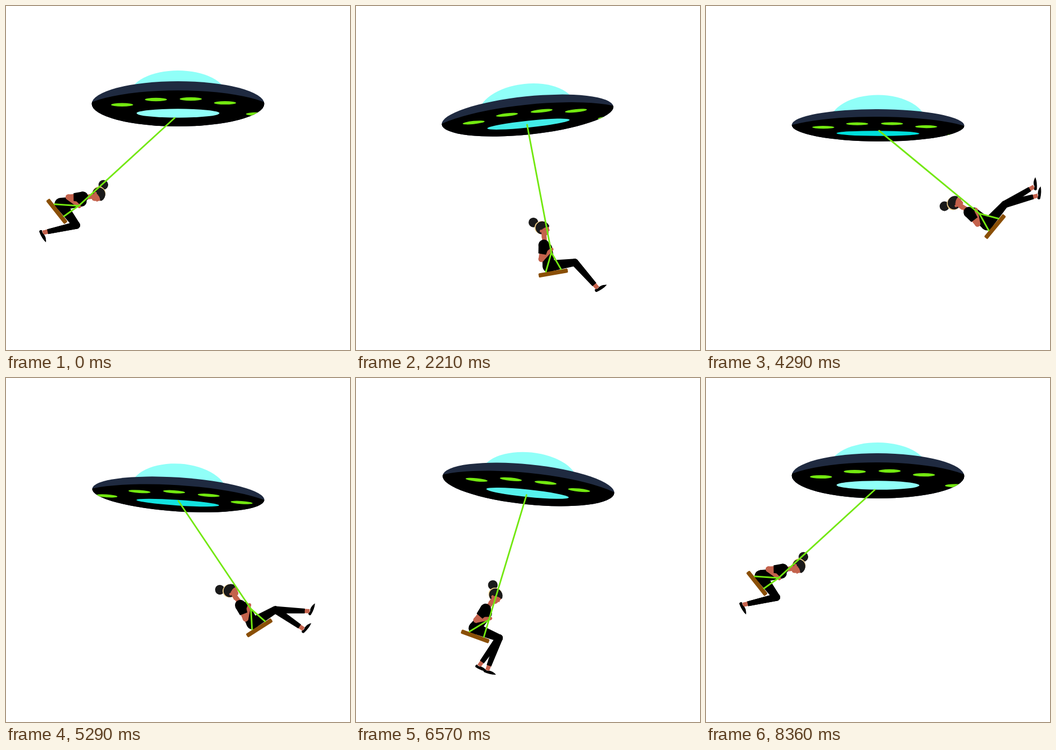
An HTML page with a canvas for the animation above (8.43 s loop, 640 by 640 pixels).

```html
<!DOCTYPE html>
<html lang="en">
<head>
<meta charset="utf-8">
<title>Saucer swing</title>
<style>
html, body { margin: 0; width: 100%; height: 100%; overflow: hidden; background: #fff; }
canvas { display: block; width: 640px; height: 640px; }
</style>
</head>
<body>
<canvas id="c" width="640" height="640"></canvas>
<script>
const g = document.getElementById('c').getContext('2d');
const LOOP = 8430, HALF = LOOP / 2, TAU = Math.PI * 2, DEG = Math.PI / 180;
const BLACK = '#000', HAIR = '#1a1a1a', SKIN = '#c4624c', GREEN = '#73e810',
      WOOD = '#8a4f06', NAVY = '#1f2a40', GLASS = '#90fff8', BAND = '#f2d08a';
const LEFT = 51.6, RIGHT = -50.5, ROPE = 280;

// progress, knot x, shoulder x, head x, head y, head turn, near shin, far shin
const FRONT = [0, 17.2, 9.2, 23, -81.3, 33.4, 115.8, 115.8];
const BACK = [1, 0, -10.5, -14.9, -86.6, 0.5, 19, 35.2];
const FORTH = [FRONT,
  [0.132, 12.3, 4.9, 15.1, -83.6, 27.9, 99.6, 99.6],
  [0.604, 3.2, -8.1, -6, -86.4, 10.1, 58.5, 58.5],
  BACK];
const RETURN = [[0, ...BACK.slice(1)],
  [0.176, 5.7, -7.2, -9, -87.5, 6.5, 34.9, 66.8],
  [0.69, 13.5, 0.9, 9.1, -85.6, 23, 90.3, 105.8],
  [1, ...FRONT.slice(1)]];

const mix = (a, b, k) => a + (b - a) * k;

// bezier easing with control points (a, 0) and (b, 1)
function ease(u, a, b) {
  let lo = 0, hi = 1, s = 0.5;
  for (let i = 0; i < 24; i++) {
    s = (lo + hi) / 2;
    const q = 1 - s;
    if (3 * s * q * q * a + 3 * s * s * q * b + s * s * s < u) lo = s; else hi = s;
  }
  return s * s * (3 - 2 * s);
}

function poseAt(keys, p) {
  let i = 1;
  while (i < keys.length - 1 && p > keys[i][0]) i++;
  const a = keys[i - 1], b = keys[i], k = (p - a[0]) / (b[0] - a[0]);
  return a.map((v, n) => mix(v, b[n], k));
}

function oval(x, y, rx, ry, fill, from = 0) {
  g.beginPath();
  g.ellipse(x, y, rx, ry, 0, from, TAU);
  g.fillStyle = fill;
  g.fill();
}

function line(pts, color, width) {
  g.beginPath();
  pts.forEach(([x, y]) => g.lineTo(x, y));
  g.strokeStyle = color;
  g.lineWidth = width;
  g.lineCap = g.lineJoin = 'round';
  g.stroke();
}

// tapered limb, round at the start and, unless cut, at the end
function limb([x1, y1], r1, [x2, y2], r2, fill, cut) {
  const d = Math.hypot(x2 - x1, y2 - y1), nx = -(y2 - y1) / d, ny = (x2 - x1) / d;
  oval(x1, y1, r1, r1, fill);
  if (!cut) oval(x2, y2, r2, r2, fill);
  g.beginPath();
  g.moveTo(x1 + nx * r1, y1 + ny * r1);
  g.lineTo(x2 + nx * r2, y2 + ny * r2);
  g.lineTo(x2 - nx * r2, y2 - ny * r2);
  g.lineTo(x1 - nx * r1, y1 - ny * r1);
  g.fill();
}

function saucer(t, c, y, tilt) {
  g.save();
  g.translate(320 + 8 * tilt, y);
  g.rotate(tilt);
  const ry = mix(42, 30, c);
  oval(0, mix(-16, -4.5, c), 90, mix(46, 52, c), GLASS, Math.PI);
  oval(0, 0, 160.5, ry, NAVY);
  g.clip();
  const br = mix(47, 35, c);
  oval(0, mix(-25, -16, c) + br, 190, br, BLACK);
  g.clip();
  const sr = mix(47, 34, c), sy = mix(-9.5, -3.7, c) + sr;
  for (let k = -5; k < 5; k++) {
    const x = 300 * Math.sin((-106.2 + 65 * (k + 4 * t / LOOP)) / 300);
    if (Math.abs(x) < 159) {
      const drop = Math.sqrt(1 - (x / 160) ** 2);
      oval(x, sy - sr * drop, 20.5, mix(3.2, 2.7, c), GREEN);
    }
  }
  const ring = `rgb(${mix(144, 0, c)},${mix(255, 222, c)},${mix(248, 220, c)})`;
  oval(0, mix(17.5, 15, c), 77, mix(8.2, 4.8, c), ring);
  g.restore();
}

function leg(knee, deg) {
  const along = n => [knee[0] + n * Math.cos(deg * DEG), knee[1] + n * Math.sin(deg * DEG)];
  limb(along(50), 4, along(64), 3.8, SKIN, true);
  limb(knee, 6.8, along(55), 4.5, BLACK, true);
  g.save();
  g.translate(...along(63));
  g.rotate((deg * 0.55 - 52) * DEG);
  g.beginPath();
  g.moveTo(-5, 0.5);
  g.quadraticCurveTo(-8, 4, -5, 6);
  g.quadraticCurveTo(8, 7.5, 18, 4);
  g.quadraticCurveTo(11, -0.5, 4, 0.5);
  g.quadraticCurveTo(0, 3, -5, 0.5);
  g.fillStyle = BLACK;
  g.fill();
  g.restore();
}

function head(x, y, turn) {
  g.save();
  g.translate(x, y);
  g.rotate(turn * DEG);
  oval(-16, -10, 9, 9, HAIR);
  oval(-1, -0.5, 12.8, 12.2, BAND);
  oval(0.4, 0, 12.4, 12, HAIR);
  g.beginPath();
  g.moveTo(1, 0);
  g.lineTo(13, -2.5);
  g.lineTo(13, 1.5);
  g.lineTo(14.5, 5);
  g.lineTo(12.6, 6);
  g.quadraticCurveTo(13, 14, 8, 13.5);
  g.lineTo(7.5, 18);
  g.lineTo(-0.5, 19);
  g.lineTo(-1, 9);
  g.fillStyle = SKIN;
  g.fill();
  oval(-1.5, 6, 2.6, 2.6, SKIN);
  g.beginPath();
  g.moveTo(-2, -11.8);
  g.quadraticCurveTo(9, -13, 13.5, -4);
  g.lineTo(13, -1.5);
  g.quadraticCurveTo(7, -2.5, 1, 2.5);
  g.fillStyle = HAIR;
  g.fill();
  g.restore();
}

function rider(pose, angle) {
  const [, kx, sx, hx, hy, turn, near, far] = pose;
  const hip = [-6, -14], knee = [43, -12.5], sh = [sx, -54.5];
  const hand = [kx + 2, -43 + 0.09 * angle];

  leg(knee, far);
  leg(knee, near);
  limb(hip, 10.5, knee, 6.8, BLACK);

  const r = turn * DEG, cs = Math.cos(r), sn = Math.sin(r);
  limb([hx + 4 * cs - 13 * sn, hy + 4 * sn + 13 * cs], 4.3, [sx + 2, -56], 4.5, SKIN);
  limb(hip, 11.5, [sx + 5, -47.5], 9.5, BLACK);
  head(hx, hy, turn);

  // elbow from two equal arm lengths
  const dx = hand[0] - sh[0], dy = hand[1] - sh[1], d = Math.hypot(dx, dy);
  const bend = Math.sqrt(Math.max(0, 27 * 27 - d * d / 4)) / d;
  const elbow = [sh[0] + dx / 2 - dy * bend, sh[1] + dy / 2 + dx * bend];
  const cuff = [mix(sh[0], elbow[0], 0.64), mix(sh[1], elbow[1], 0.64)];
  limb(cuff, 5.5, elbow, 5.2, SKIN);
  limb(elbow, 5.2, hand, 3, SKIN);
  limb(sh, 10, cuff, 7.2, BLACK, true);
}

function draw(now) {
  const t = now % LOOP, w = TAU * t / LOOP;
  const forth = t < HALF, u = forth ? t / HALF : t / HALF - 1;
  const sink = ease(u, 0.42, 0.58), c = forth ? sink : 1 - sink;
  const y = mix(182, 222, c);
  const tilt = (0.4 * Math.sin(3 * w) - 5.6 * Math.sin(w)) * DEG;
  const p = forth ? ease(u, 0.405, 0.505) : ease(u, 0.372, 0.483);
  const angle = forth ? mix(LEFT, RIGHT, p) : mix(RIGHT, LEFT, p);
  const pose = poseAt(forth ? FORTH : RETURN, p);

  g.fillStyle = '#fff';
  g.fillRect(0, 0, 640, 640);
  saucer(t, c, y, tilt);

  g.save();
  g.translate(318 - 4 * Math.cos(w), y + mix(26, 10, c));
  g.rotate(angle * DEG);
  g.translate(0, ROPE);
  rider(pose, angle);
  g.beginPath();
  g.roundRect(-27.5, -4, 55, 8, 2);
  g.fillStyle = WOOD;
  g.fill();
  const knot = [pose[1], -38];
  line([[0, -ROPE], knot], GREEN, 3);
  line([[-13, -4.8], knot, [15.5, -4.5]], GREEN, 3);
  g.restore();
}

let start;
function tick(now) {
  if (start === undefined) start = now;
  draw(now - start);
  requestAnimationFrame(tick);
}
draw(0);
requestAnimationFrame(tick);
</script>
</body>
</html>
```
